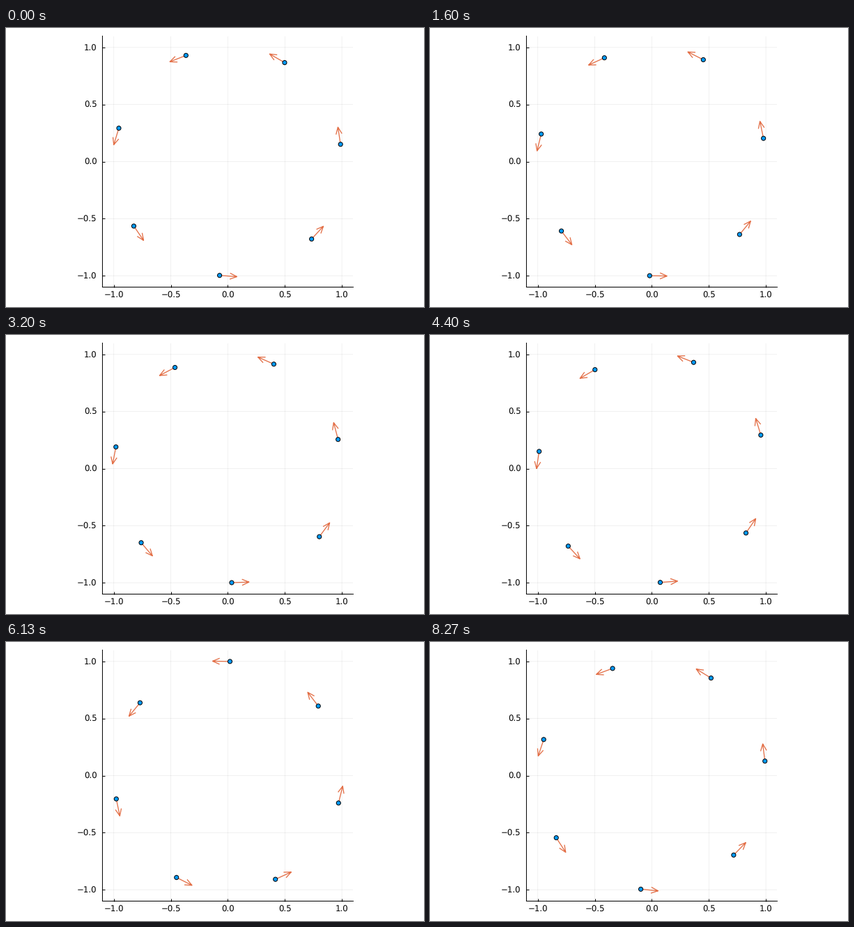
These frames come from a looping animation (600x400 px, 8340 ms). A matplotlib script:

```python
import numpy as np
import matplotlib.pyplot as plt
from matplotlib.animation import FuncAnimation
from matplotlib.patches import Circle

W, H, DPI = 600, 400, 100
PX = 72 / DPI                      # one pixel in points
SIDE = 360                         # plot area in pixels
UNIT = SIDE / 2.2                  # pixels per data unit
LOOP_MS, TICK_MS = 8340, 20
STEPS, STEP_RATE = 125, 15         # simulation steps, shown 15 per second
N, DT = 7, 0.1
HEAD_LEN, HEAD_HALF = 0.061, 0.0265

# Angular speed of N equal masses on a unit ring under mutual gravity
k = np.arange(1, N)
OMEGA = np.sqrt(np.sum(1 / np.sin(np.pi * k / N)) / 4)

plt.rcParams["font.family"] = "DejaVu Sans"
plt.rcParams["text.hinting"] = "no_hinting"
fig = plt.figure(figsize=(W / DPI, H / DPI), dpi=DPI, facecolor="white")
ax = fig.add_axes([138.45 / W, 1 - 371.5 / H, SIDE / W, SIDE / H])
ax.set(xlim=(-1.1, 1.1), ylim=(-1.1, 1.1))

ticks = np.linspace(-1, 1, 5)
ax.set_xticks(ticks)
ax.set_yticks(ticks)
ax.tick_params(direction="in", length=3.6 * PX, width=PX, labelsize=11.8 * PX)
ax.tick_params(axis="x", pad=6.6 * PX)
ax.tick_params(axis="y", pad=7.8 * PX)
ax.grid(color="black", alpha=0.1, lw=0.55 * PX)
ax.set_axisbelow(True)
for side in ("top", "right"):
    ax.spines[side].set_visible(False)
for side in ("left", "bottom"):
    ax.spines[side].set_linewidth(PX)
    ax.spines[side].set_snap(False)
for line in ax.get_xgridlines() + ax.get_ygridlines():
    line.set_snap(False)

arrows, = ax.plot([], [], color="#E36F47", lw=1.3 * PX, zorder=3,
                  solid_capstyle="butt", clip_on=False)
dots = [ax.add_patch(Circle((0, 0), 3.05 / UNIT, fc="#009AFA", ec="black",
                            lw=PX, zorder=4, clip_on=False))
        for _ in range(N)]


def arrow_path(pos, vel):
    """One broken line holding every shaft and open arrowhead."""
    along = vel / np.abs(vel)
    tip = pos + vel
    back = tip - HEAD_LEN * along
    wing = 1j * HEAD_HALF * along
    gap = np.full(N, np.nan + 0j)
    return np.stack([pos, tip, gap, back + wing, tip, back - wing, gap], 1).ravel()


def step_at(ms):
    """Step on show, with change times rounded to 10 ms."""
    return min((ms + 5) * STEP_RATE // 1000, STEPS - 1)


def update(i):
    step = step_at(i * TICK_MS + TICK_MS // 2)
    angle = OMEGA * DT * (step + 1) + 2 * np.pi * np.arange(N) / N
    pos = np.exp(1j * angle)
    path = arrow_path(pos, 1j * OMEGA * DT * pos)
    arrows.set_data(path.real, path.imag)
    for dot, p in zip(dots, pos):
        dot.center = p.real, p.imag
    return arrows, *dots


anim = FuncAnimation(fig, update, frames=LOOP_MS // TICK_MS, interval=TICK_MS,
                     repeat=True, repeat_delay=0)
plt.show()
```
